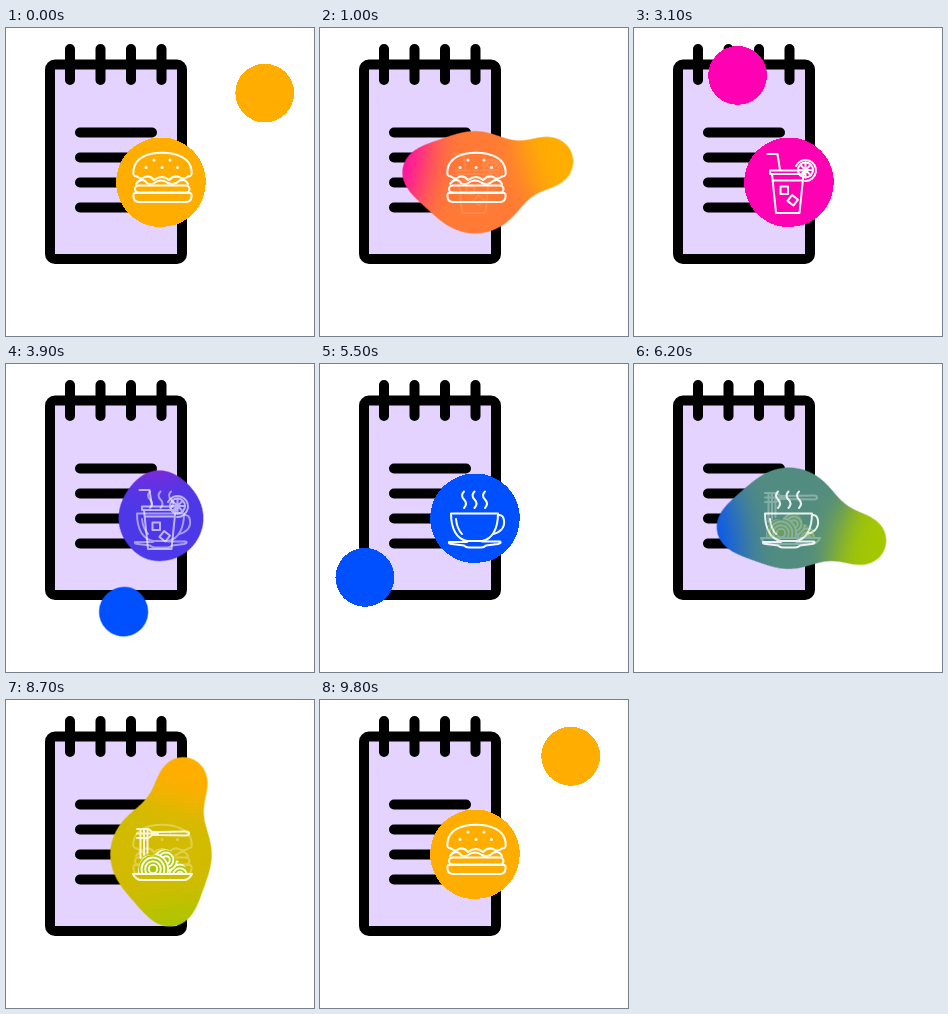
These frames come from a looping animation (308x308 px, 9900 ms). An HTML page:

```html
<!DOCTYPE html>
<html lang="en">
<head>
<meta charset="utf-8">
<title>Menu notepad</title>
<style>
html, body { margin: 0; width: 100%; height: 100%; overflow: hidden; background: #fff; }
svg { display: block; width: 100vw; height: 100vh; }
.pad { fill: none; stroke: #000; stroke-width: 10; stroke-linecap: round; stroke-linejoin: round; }
.icon { fill: none; stroke: #fff; stroke-width: 2; stroke-linecap: round; stroke-linejoin: round; }
.icon .dot { fill: #fff; stroke: none; }
</style>
</head>
<body>
<svg viewBox="0 0 308 308">
  <defs>
    <filter id="goo" filterUnits="userSpaceOnUse" x="0" y="0" width="308" height="308" color-interpolation-filters="sRGB">
      <feGaussianBlur id="blur" stdDeviation="0"/>
      <feColorMatrix values="1 0 0 0 0  0 1 0 0 0  0 0 1 0 0  0 0 0 30 -14.5"/>
    </filter>
    <clipPath id="mound"><path d="M132 174C132 158 140 153 148 156C152 147 168 146 169 160C176 162 181 166 181 174Z"/></clipPath>
  </defs>

  <g class="pad">
    <rect x="44" y="36.5" width="132" height="194.5" rx="5" fill="#e4d2ff"/>
    <path d="M64 21V52M94.5 21V52M125 21V52M155.5 21V52"/>
    <path d="M74 104.5H146M74 129.5H146M74 154.5H146M74 179.5H146"/>
  </g>

  <g filter="url(#goo)">
    <g id="balls"></g>
    <circle id="main" cx="155" cy="154.3"/>
  </g>

  <g class="icon" stroke-width="2.4">
    <path d="M131 148.5C127 148.5 127 146 127.5 142C129 130 141 124.7 156 124.7S184 130 185.5 142C186 146 186 148.5 182 148.5"/>
    <path d="M131 148.5Q134 151 137 150Q143 146 148 152Q156 146 163 152Q169 146 175 150Q179 151 182 148.5"/>
    <path d="M130 156Q134 150 139 153Q143 158 148 155Q155 150 162 155Q168 158 173 153Q179 150 182 156"/>
    <rect x="129" y="157.5" width="54.5" height="7" rx="3.5"/>
    <path d="M129 165H184Q186 165 185.5 169Q185 174 180 174H133Q128 174 127.5 169Q127 165 129 165Z"/>
    <g class="dot">
      <circle cx="148" cy="132" r="1.5"/><circle cx="164" cy="132" r="1.5"/>
      <circle cx="140" cy="139.500" r="1.5"/><circle cx="156" cy="139.500" r="1.5"/><circle cx="171.500" cy="139.500" r="1.5"/>
    </g>
  </g>

  <g class="icon">
    <path d="M133.500 126H143.500L146 142M136 142.500H171V146H136ZM138 146L142 185H165.500L169.500 146M139 152.500H168.500"/>
    <path d="M162 138A10.500 10.500 0 1 1 171 153"/>
    <circle cx="171.500" cy="142" r="7.500"/>
    <path d="M171.500 134.500V149.500M164 142H179M166.200 136.700L176.800 147.300M176.800 136.700L166.200 147.300"/>
    <rect x="146.500" y="158.500" width="7.500" height="7.500"/>
    <rect x="155" y="168.500" width="7.500" height="7.500" transform="rotate(38 158.700 172.200)"/>
  </g>

  <g class="icon">
    <path d="M144 127.500q-4 4 0 8t0 8.500M154.500 127.500q-4 4 0 8t0 8.500M165 127.500q-4 4 0 8t0 8.500"/>
    <path d="M131 149.500H178C178 165 172 175.500 162 177H147C137 175.500 131 165 131 149.500Z"/>
    <path d="M178 151C185 150 186 161 181 166Q178 169 173.500 170M136 155Q137 165 142 170"/>
    <path d="M147 178H129Q128 180 132 180L144 181.500Q146 183.500 149 183.500H161Q164 183.500 166 181.500L178 180Q182 179 180 177.500H162"/>
  </g>

  <g class="icon">
    <path d="M131 129H140Q144 129 146 132H152M131 133.500H152M131 138H140Q144 138 146 135H152"/>
    <path d="M152 132L180 131.500Q183 131.500 183 133.500T180 135.500L152 135Z"/>
    <path d="M134.500 129V158M138 129V155M141.500 129V153"/>
    <g id="noodles" clip-path="url(#mound)"></g>
    <path d="M127 174H186Q183 180 178 180H135Q130 180 127 174Z"/>
  </g>
</svg>
<script>
const NS = 'http://www.w3.org/2000/svg';
const CX = 155, CY = 154.3;
const LOOP = 9900, TURN = 10000, PHASE = 2500;
const COLORS = [[255, 174, 0], [255, 0, 178], [0, 80, 255], [164, 200, 0]];
const $ = id => document.getElementById(id);
const clamp = v => Math.max(0, Math.min(1, v));
const rgb = c => `rgb(${c.map(Math.round)})`;
const mix = (a, b, k) => a.map((v, i) => v + (b[i] - v) * k);
const plateau = (x, mid, width) => Math.exp(-(((x - mid) / width) ** 4));

function circle(parent, attrs) {
  const el = document.createElementNS(NS, 'circle');
  for (const key in attrs) el.setAttribute(key, attrs[key]);
  parent.append(el);
  return el;
}

for (const [cx, cy, outer] of [[174, 175, 14], [160, 160, 11], [147, 169, 15]]) {
  for (let r = outer; r > 1; r -= 3.6)
    circle($('noodles'), { cx, cy, r, fill: r === outer ? rgb(COLORS[3]) : 'none' });
}

const balls = COLORS.map(c => circle($('balls'), { r: 29.4, fill: rgb(c) }));
const icons = document.querySelectorAll('.icon');

// Time since ball i left the centre, from -2000 to 8000
const age = (t, i) => (t + 3500 - i * PHASE + 2 * TURN) % TURN - 2000;

function placeBall(el, s, i) {
  const d = Math.abs(s - 1350) / 1900;
  el.style.display = d < 1 ? '' : 'none';
  if (d >= 1) return;
  const reach = 137 * (1 + Math.cos(Math.PI * d ** 1.54)) / 2;
  const angle = (270 - 90 * i + 11.8 + s * 0.025) * Math.PI / 180;
  el.setAttribute('cx', CX + reach * Math.cos(angle));
  el.setAttribute('cy', CY + reach * Math.sin(angle));
}

function draw(t) {
  const ages = COLORS.map((_, i) => age(t, i));
  balls.forEach((el, i) => placeBall(el, ages[i], i));

  const now = ages.findIndex(s => s >= -500 && s < 2000);
  const old = (now + 3) % 4;
  const s = ages[now];
  $('main').setAttribute('r', 44.8 + 9 * plateau(s, 90, 230));
  $('main').setAttribute('fill', rgb(mix(COLORS[old], COLORS[now], clamp((s + 300) / 1000))));
  const sigma = 17 * plateau(s, 170, 450);
  $('blur').setAttribute('stdDeviation', sigma < 0.2 ? 0 : sigma);

  icons.forEach((el, i) => {
    el.style.opacity = i === now ? clamp((s + 100) / 1000)
      : i === old ? clamp((900 - s) / 800) : 0;
  });
}

const start = performance.now();
function tick() {
  const t = (performance.now() - start) % LOOP;
  draw(Math.floor(t / 100) * 100);
  requestAnimationFrame(tick);
}
tick();
</script>
</body>
</html>
```
